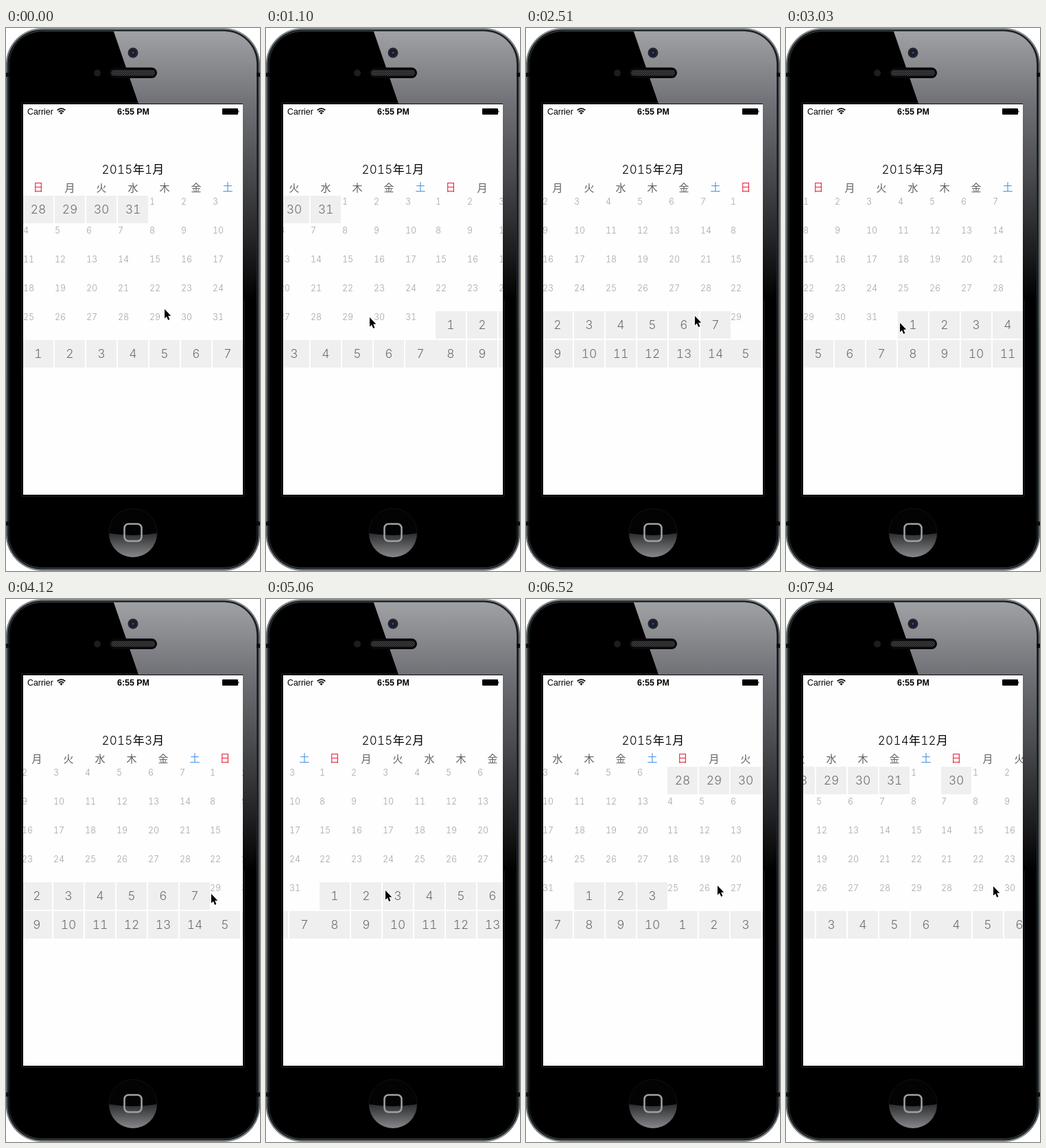
Animation, 370 px wide and 790 px high, one loop 8 s. Source, as an HTML page:

```html
<!DOCTYPE html>
<html lang="ja">
<head>
<meta charset="utf-8">
<title>Calendar</title>
<style>
html, body { margin: 0; width: 100%; height: 100%; overflow: hidden; background: #fff; }
svg { display: block; width: 370px; height: 790px; }
text { font-family: Inter, "Noto Sans CJK JP", "Noto Sans CJK", sans-serif; font-weight: 350; font-variant-numeric: tabular-nums; }
.status { font: 12.4px "Liberation Sans", Arial, sans-serif; }
.bold { font-weight: 700; }
.mid { text-anchor: middle; }
.title { font-size: 17px; letter-spacing: .3px; }
.week { font-size: 15px; }
.small { font-size: 12.5px; fill: #a4a4a4; }
.big { font-size: 17.5px; fill: #707070; }
</style>
</head>
<body>
<svg viewBox="0 0 370 790">
  <defs>
    <linearGradient id="gloss" x1="0" y1="5" x2="0" y2="395" gradientUnits="userSpaceOnUse">
      <stop offset="0" stop-color="#a0a1a5"/>
      <stop offset=".27" stop-color="#707176"/>
      <stop offset=".55" stop-color="#47484b"/>
      <stop offset=".85" stop-color="#18181a"/>
      <stop offset="1" stop-color="#000"/>
    </linearGradient>
    <linearGradient id="rim" x1="0" y1="0" x2="0" y2="1">
      <stop offset="0" stop-color="#7d8488"/>
      <stop offset=".06" stop-color="#363e42"/>
      <stop offset=".94" stop-color="#2c3337"/>
      <stop offset="1" stop-color="#7d8488"/>
    </linearGradient>
    <linearGradient id="home" x1="0" y1="0" x2="0" y2="1">
      <stop offset="0" stop-color="#2b2c2e"/>
      <stop offset="1" stop-color="#86888b"/>
    </linearGradient>
    <pattern id="mesh" width="3" height="3" patternUnits="userSpaceOnUse">
      <rect width="3" height="3" fill="#1b1b1c"/>
      <path d="M0 0L3 3M3 0L0 3" stroke="#4a4b4e" stroke-width=".7"/>
    </pattern>
    <clipPath id="face"><rect x="5" y="5" width="360" height="780" rx="47"/></clipPath>
    <clipPath id="screen"><rect x="25" y="111" width="320" height="568"/></clipPath>
  </defs>

  <rect width="370" height="790" rx="53" fill="url(#rim)"/>
  <rect x="1" y="1" width="368" height="788" rx="52" fill="none" stroke="#8d9396"/>
  <rect x="3.5" y="3.5" width="363" height="783" rx="49" fill="none" stroke="#15191b" stroke-width="2"/>
  <path d="M0 68H5M365 68H370M0 721H5M365 721H370" stroke="#0c0e10" stroke-width="6"/>
  <g clip-path="url(#face)">
    <rect width="370" height="790" fill="#000"/>
    <rect x="22.500" y="108.500" width="325" height="573" fill="#08090b" stroke="#15171a"/>
    <path d="M156.500 4L193 110H345V395H370V4Z" fill="url(#gloss)"/>
  </g>

  <circle cx="185" cy="36" r="7.500" fill="#25262b"/>
  <circle cx="185" cy="36" r="4.500" fill="#141a2c"/>
  <circle cx="185" cy="36" r="2" fill="#2a4270"/>
  <circle cx="133" cy="65.500" r="5" fill="#1d1d1f"/>
  <rect x="150" y="57.500" width="70" height="15.500" rx="7.750" fill="#08080a"/>
  <rect x="153" y="61" width="64" height="8.500" rx="4.250" fill="url(#mesh)"/>

  <circle cx="185" cy="734" r="35" fill="#030304" stroke="#111113"/>
  <path d="M150 735Q185 741 220 735A35 35 0 0 1 150 735Z" fill="url(#home)"/>
  <rect x="172.500" y="721.500" width="25" height="25" rx="6" fill="none" stroke="#a0a1a3" stroke-width="2.500"/>

  <g clip-path="url(#screen)">
    <rect x="25" y="111" width="320" height="568" fill="#fefefe"/>
    <text class="status" x="31" y="126">Carrier</text>
    <text class="status bold mid" x="185.500" y="126">6:55 PM</text>
    <path d="M74.700 119.700Q80.500 114.500 86.300 119.700M76.900 122Q80.500 118.800 84.100 122"
          fill="none" stroke="#000" stroke-width="1.800"/>
    <path d="M78.400 123.400Q80.500 121.700 82.600 123.400L80.500 125.700Z"/>
    <rect x="315" y="117" width="23" height="9" rx="1"/>
    <path d="M338.500 119.500Q340.500 121.500 338.500 123.500Z"/>
    <text id="title" class="title mid" x="185" y="212"></text>
    <g id="track"></g>
  </g>
  <path id="cursor" d="M0 0V13.500L3 10.700L5.200 16L7.400 15L5.200 9.800H9.300Z"
        stroke="#fff" stroke-width="1.600" paint-order="stroke"/>
</svg>
<script>
const LOOP = 8000, TICK = 58, PAGE = 320, DRAG = 348, RETURN_END = 1000;
const $ = id => document.getElementById(id);

function add(parent, tag, attrs, text = '') {
  const el = document.createElementNS('http://www.w3.org/2000/svg', tag);
  for (const key in attrs) el.setAttribute(key, attrs[key]);
  el.textContent = text;
  return parent.appendChild(el);
}

// Pages run from November 2014 to March 2015.
const monthOf = page => new Date(2014, 10 + page, 1);
const titleOf = page => {
  const d = monthOf(page);
  return `${d.getFullYear()}年${d.getMonth() + 1}月`;
};

function buildPage(page) {
  const first = monthOf(page);
  const g = add($('track'), 'g', { transform: `translate(${page * PAGE} 0)` });
  [...'日月火水木金土'].forEach((name, i) => {
    const fill = i === 0 ? '#ec2a45' : i === 6 ? '#4f9ade' : '#606060';
    add(g, 'text', { class: 'week mid', x: 46 * i + 22, y: i % 6 ? 238 : 237, fill }, name);
  });
  for (let i = 0; i < 42; i++) {
    const date = new Date(first.getFullYear(), first.getMonth(), 1 - first.getDay() + i);
    const x = i % 7 * 46, y = 244 + Math.floor(i / 7) * 42;
    if (date.getMonth() === first.getMonth()) {
      add(g, 'text', { class: 'small', x, y: y + 12.5 }, date.getDate());
    } else {
      add(g, 'rect', { x, y, width: 44, height: 40, fill: '#efefef' });
      add(g, 'text', { class: 'big mid', x: x + 22, y: y + 26 }, date.getDate());
    }
  }
}
for (let page = 0; page < 5; page++) buildPage(page);

// Each swipe drags the pointer from grab to drop and turns one page.
const swipes = [
  { start: 930, step: 1, duration: 600, grab: [237, 410], drop: [83, 429] },
  { start: 2400, step: 1, duration: 580, grab: [279, 415], drop: [171, 429] },
  { start: 3770, step: -1, duration: 580, grab: [153, 428], drop: [299, 429] },
  { start: 5000, step: -1, duration: 520, grab: [133, 421], drop: [267, 432] },
  { start: 6288, step: -1, duration: 651, grab: [140, 409], drop: [296, 418] },
  { start: 7708, step: -1, duration: 580, grab: [125, 410], drop: [324, 419] },
];
const firstPage = 2, rest = [231, 409];

const progress = (t, from, to) => Math.min(1, Math.max(0, (t - from) / (to - from)));
const easeOut = u => 1 - (1 - u) ** 2;
const easeInOut = u => u * u * (3 - 2 * u);
const pageEase = u => 1 - (1 - u ** 1.2) ** 2.44;
const mix = (a, b, u) => a.map((v, i) => Math.round(v + (b[i] - v) * u));

function pointerAt(t, swipe, next) {
  if (!swipe) return mix(rest, next.grab, easeInOut(progress(t, 60, 450)));
  if (t < DRAG || !next) return mix(swipe.grab, swipe.drop, easeOut(progress(t, 0, DRAG)));
  return mix(swipe.drop, next.grab, easeInOut(progress(t, DRAG, RETURN_END)));
}

function draw(time) {
  const count = swipes.filter(s => s.start <= time).length;
  const swipe = swipes[count - 1], start = swipe ? swipe.start : 0;
  const t = Math.floor((time - start) / TICK) * TICK;

  let page = swipes.slice(0, Math.max(0, count - 1)).reduce((sum, s) => sum + s.step, firstPage);
  let offset = page * PAGE;
  if (swipe) {
    const u = progress(t, 0, swipe.duration);
    offset += swipe.step * PAGE * pageEase(u);
    if (u === 1) page += swipe.step;
  }

  $('track').setAttribute('transform', `translate(${25 - Math.round(offset)} 0)`);
  $('title').textContent = titleOf(page);
  $('cursor').setAttribute('transform', `translate(${pointerAt(t, swipe, swipes[count])})`);
}

const begin = performance.now();
function frame() {
  draw((performance.now() - begin) % LOOP);
  requestAnimationFrame(frame);
}
frame();
</script>
</body>
</html>
```
